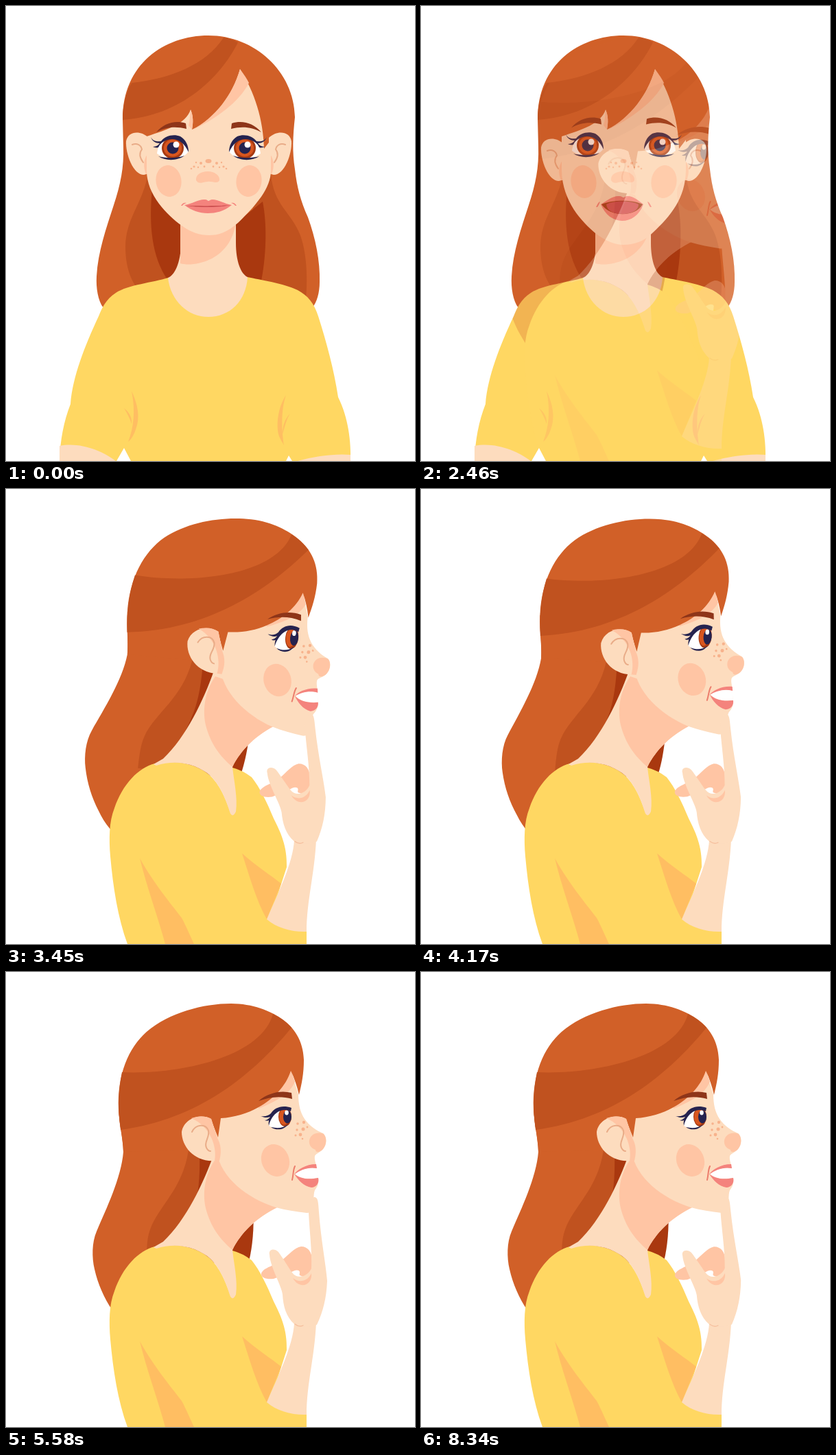
Animation of 596x663 px, one loop 8.37 s. Source, as an HTML page with a canvas:

```html
<!DOCTYPE html>
<html lang="en">
<head>
<meta charset="utf-8">
<title>Thinking woman</title>
<style>
html, body { margin: 0; width: 100%; height: 100%; overflow: hidden; background: #fff; }
canvas { display: block; width: 596px; height: 663px; }
</style>
</head>
<body>
<canvas id="stage" width="596" height="663"></canvas>
<script>
const W = 596, H = 663, LOOP = 8370;
const HAIR = '#d16028', HAIR_DARK = '#c0521f', HAIR_DEEP = '#a9380f';
const SKIN = '#fddcbe', BLUSH = '#ffc5a4', LINE = '#e9ac88', FRECKLE = '#f7b28c';
const SHIRT = '#ffd762', FOLD = '#ffbe62', NAVY = '#25234f', BROW = '#8e3519';
const LIP = '#f4837d', TONGUE = '#d04d55', RUST = '#d8561f', RING = '#a63a12';

const layer = () => Object.assign(document.createElement('canvas'), { width: W, height: H }).getContext('2d');
const stage = document.getElementById('stage').getContext('2d');
const front = layer(), side = layer();

const clamp = x => Math.max(0, Math.min(1, x));
const ramp = (t, a, b) => clamp((t - a) / (b - a));

function mix(a, b, k) {
  const ends = b.match(/-?[\d.]+/g);
  let i = 0;
  return a.replace(/-?[\d.]+/g, n => +n + (ends[i++] - n) * k);
}
function fill(c, color, ...paths) {
  c.fillStyle = color;
  for (const d of paths) c.fill(new Path2D(d));
}
function line(c, color, width, d) {
  c.strokeStyle = color;
  c.lineWidth = width;
  c.lineCap = 'round';
  c.stroke(new Path2D(d));
}
function oval(c, color, x, y, rx, ry = rx, turn = 0) {
  c.fillStyle = color;
  c.beginPath();
  c.ellipse(x, y, rx, ry, turn, 0, 7);
  c.fill();
}
function within(c, change, draw) {
  c.save();
  change();
  draw();
  c.restore();
}
function turned(c, x, y, degrees, draw) {
  within(c, () => {
    c.translate(x, y);
    c.rotate(degrees * Math.PI / 180);
    c.translate(-x, -y);
  }, draw);
}
function bothSides(c, draw) {
  draw(false);
  within(c, () => { c.translate(591, 0); c.scale(-1, 1); }, () => draw(true));
}

// k: 0 = calm face, 1 = chin lifted with open mouth
function drawFront(c, k) {
  c.clearRect(0, 0, W, H);
  fill(c, HAIR, 'M170 165C170 85 230 43 295 43C362 43 420 95 421 162C418 190 417 212 421 238C424 264 429 283 440 308C451 338 458 372 457 402C457 418 453 432 446 440L142 440C134 430 131 410 132 394C134 358 146 324 157 290C167 260 172 235 171 205Z');
  fill(c, HAIR_DARK,
    'M183 112C240 106 292 85 317 46Q328 47 338 53C312 105 255 160 170 166C170 145 175 125 183 112Z',
    'M206 250C196 292 175 310 174 350C174 380 182 400 192 412L245 400L235 270Z',
    'M386 245C390 290 415 300 428 332C438 357 440 395 437 428L360 405L360 280Z');
  fill(c, HAIR_DEEP,
    'M213 265C208 320 212 365 236 400L262 380L262 300Z',
    'M374 285C381 320 379 368 371 405L335 395L330 320Z');
  fill(c, SHIRT, 'M236 396C215 403 178 406 160 418C145 428 140 440 135 452C115 495 97 540 94 580C84 606 79 632 78 663L161 663L172 644L182 663L408 663L412 655L417 663L502 663C503 635 499 600 484 570C478 530 467 490 455 452C449 433 440 422 425 414C405 404 370 399 352 395Z');
  fill(c, FOLD,
    'M183 561C192 580 196 600 189 617C186 626 182 632 178 635C186 615 189 590 183 561Z',
    'M172 586C181 593 184 602 183 609C181 602 177 594 172 586Z',
    'M408 567C396 585 393 612 398 627C400 632 403 636 405 640C402 620 400 590 408 567Z',
    'M414 594C406 602 403 612 403 624C407 610 409 601 414 594Z');
  fill(c, SKIN,
    'M78 641C108 635 140 648 160 663L78 663Z',
    'M425 663C450 656 480 652 502 654L502 663Z',
    'M254 300L255 345C255 375 245 393 236 396C240 430 265 453 295 453C326 453 350 430 352 395C342 390 335 372 335 345L335 300Z');
  fill(c, BLUSH, 'M254 310L254 375C264 378 282 377 300 368C320 357 333 338 336 310Z');

  within(c, () => c.translate(0, 9 * k), () => bothSides(c, () => {
    fill(c, SKIN, 'M208 192C196 181 178 182 175 197C174 215 185 246 201 246L208 244Z');
    line(c, LINE, 2, 'M184 202C191 199 197 203 198 209C194 214 194 220 200 228');
    fill(c, BLUSH, 'M206 216C200 224 200 236 204 245L208 244L208 216Z');
  }));

  const brim = 'M205 190C235 180 262 172 269 151C273 160 273 170 271 180C305 165 330 130 341 92C362 125 375 165 376 208L386 195L386 240';
  fill(c, SKIN, brim + mix(
    'C386 265 365 290 338 316C322 330 310 334 296 334C282 334 270 330 256 320C235 305 205 275 205 240Z',
    'C385 280 365 305 337 331C325 343 310 348 295 348C283 348 270 343 254 331C235 315 206 285 205 240Z', k));
  fill(c, BLUSH, 'M341 92C347 100 351 106 354 112C340 140 305 165 271 181C305 162 330 130 341 92Z',
    'M269 151C273 160 273 170 271 180L266 174C268 167 268 160 269 151Z');

  oval(c, BLUSH, 237, 255 + k, 18.5, 23 + k, -.15);
  oval(c, BLUSH, 354, 255 + k, 18.5, 23 + k, .15);
  fill(c, BLUSH, 'M277 254C276 246 284 241 294 241C304 241 312 247 311 254C308 260 300 255 294 256C288 256 281 261 277 254Z');
  oval(c, FRECKLE, 295, 226, 4.5, 3);
  bothSides(c, () => {
    for (const [x, y, r] of [[284, 229, 2], [277, 228, 1.2], [274, 234, 1.6], [289, 234, 1.4], [280, 235, 1.2], [270, 237, 1.3]])
      oval(c, FRECKLE, x, y, r);
  });

  bothSides(c, flipped => {
    within(c, () => c.translate(0, -6.5 * k), () =>
      fill(c, BROW, 'M219 184C230 171 246 166 262 171L263 179C247 175 233 176 219 184Z'));
    within(c, () => c.translate(0, -4 * k), () => {
      fill(c, '#fff', 'M220 215C222 198 232 189 245 189C258 191 264 201 266 212C258 224 235 226 220 215Z');
      oval(c, RING, 243, 207, 16, 15.5);
      oval(c, RUST, 243, 207, 13, 12.5);
      oval(c, NAVY, 243, 207, 8.5);
      oval(c, '#fff', flipped ? 239 : 248, 202, 4.5);
      fill(c, NAVY,
        'M211 191C214 197 220 198 226 197C232 189 244 186 254 190C262 195 266 203 266 213C260 200 252 194 242 194C233 194 226 199 220 207C221 203 223 201 224 200C218 200 213 197 211 191Z',
        'M214 205C218 205 222 203 225 200L222 206C219 207 216 206 214 205Z',
        'M222 219C232 222 250 222 260 218C250 226 232 226 222 219Z');
    });
  });

  bothSides(c, () => fill(c, LIP, mix(
    'M255 291C257 287 260 286 263 287C260 288 258 289 257 291Z',
    'M255 293C257 289 258 286 261 285C260 288 259 290 257 293Z', k)));
  fill(c, LIP, mix(
    'M260 290C272 288 282 281 290 282C293 282 294 284 295 284C296 284 298 282 301 282C309 282 318 288 329 290C318 299 306 302 294 302C282 302 270 298 260 290Z',
    'M262 289C270 284 280 276 289 277C292 277 294 279 295 279C296 279 298 277 301 277C310 277 319 285 324 289C318 305 306 313 293 313C280 313 268 304 262 289Z', k));
  fill(c, '#9c3b17', mix(
    'M262 291C280 292 310 292 327 290C310 293 280 293 262 291Z',
    'M263 289C280 282 308 282 323 289C312 308 276 308 263 289Z', k));
  fill(c, TONGUE, mix(
    'M262 291C280 292 310 292 327 290C320 292 306 293 294 293C281 293 270 292 262 291Z',
    'M270 289C280 283 306 283 317 289C317 298 306 303 294 303C281 303 271 299 270 289Z', k));
}

function drawSideFace(c, eyeOpen) {
  fill(c, SKIN, 'M303 214L415 142L426 178C426 194 429 205 435 214C442 224 452 231 462 235C468 240 468 251 462 258C458 263 452 264 450 268C449 274 452 279 452 283L455 302C456 309 453 314 450 318C447 326 450 336 446 345C444 350 442 351 438 351C422 349 408 347 393 343C352 330 313 300 307 262Z');
  fill(c, BLUSH, 'M415 143L421 160C414 176 398 187 368 199L368 190Z',
    'M307 240C314 252 314 262 311 275L303 275Z',
    'M442 245C444 236 454 232 463 236C468 242 467 252 462 258C456 264 451 263 451 259C445 257 441 252 442 245Z');
  oval(c, BLUSH, 392.5, 274.5, 20, 24, -.4);
  for (const [x, y, r] of [[425, 221, 1.8], [434, 219, 2.2], [424, 230, 1.7], [433, 229, 2.5], [422, 238, 1.5], [429, 237, 2.4], [439, 226, 1.4], [432, 243, 1.3]])
    oval(c, FRECKLE, x, y, r);

  within(c, () => { c.translate(0, 212); c.scale(1, eyeOpen); c.translate(0, -212); }, () => {
    fill(c, '#fff', 'M383 224C386 205 395 196 408 197C414 205 416 215 411 224C404 229 392 230 383 224Z');
    oval(c, RING, 406.5, 211, 9.5, 14);
    oval(c, RUST, 405, 211, 7, 11.5);
    oval(c, NAVY, 410, 211, 6, 9.5);
    oval(c, '#fff', 409, 205, 2.8, 3.4);
    fill(c, NAVY,
      'M371 210C378 211 383 209 386 206C391 198 402 193 416 198L415 203C404 198 394 203 388 212C386 215 384 219 383 224C382 219 383 215 385 211C380 213 376 212 371 210Z',
      'M377 216C380 216 383 214 386 210L384 216C381 217 379 217 377 216Z',
      'M386 226C395 228 403 228 411 222C405 231 393 231 386 226Z');
  });

  within(c, () => c.translate(0, -1), () => {
    fill(c, '#fff', 'M421 295C432 287 445 285 453 287L455 301C440 304 428 302 421 295Z');
    fill(c, LIP, 'M420 296C424 289 437 281 452 281L453 287C440 285 430 289 420 296Z',
      'M420 295C428 302 440 304 455 301C457 308 452 315 445 315C434 313 426 305 420 295Z');
    line(c, '#ec7d6c', 2, 'M421 284C418 290 419 297 417 304');
  });
}

function drawSide(c, nod, tap, eyeOpen) {
  const head = draw => turned(c, 359, 303, nod, draw);
  c.clearRect(0, 0, W, H);
  head(() => {
    fill(c, HAIR_DEEP, 'M300 270L360 345C362 372 359 402 354 421L290 425Z');
    fill(c, HAIR, 'M164 200C166 228 171 245 171 262C168 300 146 345 132 378C125 394 125 416 129 433C134 455 143 475 155 493C166 511 180 525 200 535L260 520L265 400L304 275L300 200Z');
    fill(c, HAIR_DARK, 'M267 250C262 310 228 335 212 370C206 385 205 395 205 425L290 425L304 275Z');
    fill(c, HAIR_DEEP, 'M282 266C283 300 280 325 275 340C270 360 262 378 252 394L310 340L306 268Z');
  });

  fill(c, SHIRT, 'M217 400C193 406 170 430 158 465C150 485 150 510 152 535C156 580 163 625 177 663L438 663L438 640L390 610L409 551C410 520 400 500 390 480C380 456 370 435 358 420Q345 410 330 406L328 473C322 458 315 435 298 418C280 402 250 393 217 401Z');
  fill(c, FOLD, 'M195 538C215 575 245 610 256 625C264 640 270 655 274 663L232 663C222 625 205 580 195 538Z',
    'M344 531C365 550 385 562 401 575L380 627C365 600 355 565 344 531Z');
  fill(c, SKIN,
    'M303 265C288 307 263 361 229 393L215 401L219 403C250 393 280 402 298 418C315 435 322 458 327 473Q331 479 335 470C338 450 332 425 330 405C342 380 365 358 395 343L400 320L350 265Z',
    'M420 512C418 545 398 585 380 627C395 640 418 646 438 645C438 600 450 560 452 510Z');
  fill(c, BLUSH, 'M305 273C290 295 286 320 291 344C299 375 315 392 330 405C342 380 365 358 395 343L340 285Z');

  head(() => {
    drawSideFace(c, eyeOpen);
    fill(c, HAIR, 'M164 200C162 150 178 111 205 87C238 59 288 46 328 46C360 46 385 57 400 67C420 80 433 100 434 128C434 148 431 163 427 179C424 166 420 154 415 144C408 166 390 185 368 197C352 206 333 212 313 213L309 241L298 214L270 260L171 262C170 240 165 222 164 200Z');
    fill(c, HAIR_DARK, 'M169 146C250 150 372 125 389 61Q404 68 416 81C360 150 280 215 167 230C163 200 163 175 169 146Z');
    fill(c, BROW, 'M368 188C382 176 400 172 416 176L417 185C400 180 384 182 368 188Z');
    fill(c, SKIN, 'M299 214C285 206 260 212 256 233C256 255 275 277 304 275C311 268 308 252 308 242Z');
    fill(c, BLUSH, 'M270 213C282 209 292 210 299 214L308 242C311 256 311 270 304 275C308 255 298 225 270 213Z');
    line(c, LINE, 2, 'M271 233C276 222 291 220 295 231C297 242 288 247 292 256C294 260 296 261 298 261');
  });

  turned(c, 434, 514, -2 * tap, () => {
    fill(c, BLUSH, 'M372 439C376 430 392 428 402 420C412 412 420 402 430 400C440 400 446 408 446 420L446 440C440 448 428 444 420 436L390 447C380 448 371 446 372 439Z');
    fill(c, '#fff', 'M415 438C420 434 427 433 428 437L427 447Z');
    fill(c, SKIN, 'M384 412C382 404 391 402 397 408C403 416 410 428 417 438C425 449 440 443 445 432C446 405 442 375 441 350C441 336 446 327 450 328C455 329 455 336 456 350C459 390 466 425 468 450C467 475 462 495 453 514C443 519 428 517 420 513C408 502 404 487 403 470C402 458 385 430 384 412Z');
    fill(c, BLUSH, 'M418 446C428 454 440 450 445 439C447 456 428 464 418 446Z');
    line(c, '#f5bd9b', 1.2, 'M421 513Q427 518 433 515');
  });
}

function render(t) {
  const fade = ramp(t, 2340, 2850);
  if (fade < 1) drawFront(front, ramp(t, 285, 1050));
  if (fade > 0) {
    const nod = 7.8 * (ramp(t, 2050, 3735) - ramp(t, 3855, 4690));
    const tap = (1 - Math.cos((t - 5580) / 594 * 2 * Math.PI)) / 2;
    const blink = t > 4710 && t < 8040 ? clamp(1 - Math.abs((t - 4710) % 840 - 420) / 90) : 0;
    const wide = 1.17 - .17 * ramp(t, 4690, 5500);
    drawSide(side, nod, tap, wide * (1 - .85 * blink));
  }
  // The more opaque figure keeps its outline; the other shows only inside it.
  const sideShare = fade / (fade + (1 - fade) ** 2);
  const [base, over, share] = fade < .5 ? [front, side, sideShare] : [side, front, 1 - sideShare];
  stage.clearRect(0, 0, W, H);
  stage.drawImage(base.canvas, 0, 0);
  if (share > 0) {
    within(stage, () => {
      stage.globalCompositeOperation = 'source-atop';
      stage.globalAlpha = share;
    }, () => stage.drawImage(over.canvas, 0, 0));
  }
}

const start = performance.now();
function tick() {
  render((performance.now() - start) % LOOP);
  requestAnimationFrame(tick);
}
tick();
</script>
</body>
</html>
```
